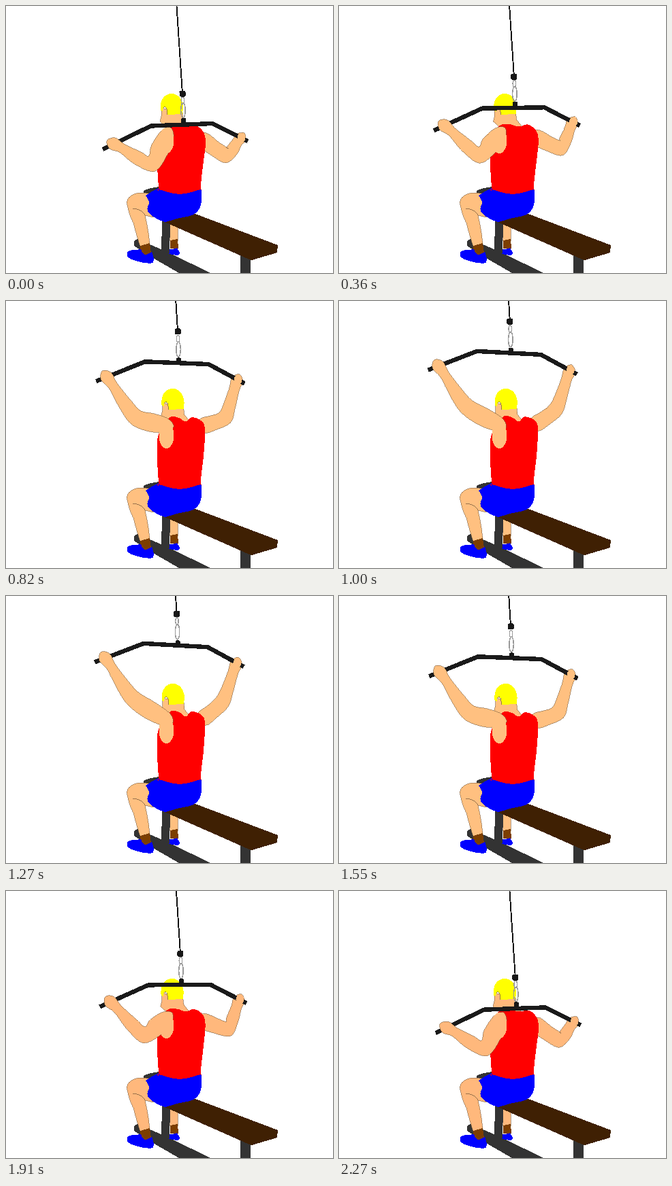
An HTML page for the animation above (2.36 s loop, 480 by 393 pixels).

```html
<!DOCTYPE html>
<html lang="en">
<head>
<meta charset="utf-8">
<title>Pulldown exercise</title>
<style>
  html, body { margin: 0; width: 100%; height: 100%; overflow: hidden; background: #fff; }
  svg { display: block; width: 100vw; height: 100vh; shape-rendering: crispEdges; }
  .skin { fill: var(--skin); stroke: #80603f; stroke-width: .6; }
  .bare { stroke: none; }
  .metal { fill: #333; }
  .wood { fill: #3f2003; }
  .sock { fill: #7c3e00; }
  .blue { fill: #00f; }
  .red { fill: #f00; }
  .line { fill: none; stroke: #80603f; stroke-width: .8; }
  .link { fill: none; stroke: #999; stroke-width: 1.4; }
  .dark { fill: #171717; }
  #bar { fill: none; stroke: #1a1a1a; stroke-width: 6.4; stroke-linejoin: round; }
  #cable { stroke: #111; stroke-width: 1.9; }
</style>
</head>
<body>
<svg viewBox="0 0 480 393">
  <g id="machine">
    <path class="metal" d="M202 272Q208 268 226 266V276L206 278Q201 276 202 272Z"/>
    <path class="metal" d="M188 346L193 343L241 364L300 393H254L216 371L188 353Z"/>
    <path class="skin" d="M239 316L252 313L252 346H241Z"/>
    <path class="sock" d="M241 345L252 343L253 357L241 357Z"/>
    <path class="blue" d="M239 358Q247 358 251 356L255 363Q255 367 251 367L239 365Z"/>
    <path class="metal" d="M344.3 364H359V393H344.3ZM229 315L241 319L240 364L228 363Z"/>
    <path class="wood" d="M233 318L240 313L278 306L399 352L398 363L361 374L357 373Z"/>
  </g>
  <g id="legs">
    <path class="skin" d="M209 276Q193 273 184 279Q175 285 178 293Q180 305 187 319Q191 336 197 354L211 351Q210 338 207 322Q205 313 204 308L216 311L222 285Z"/>
    <path class="line" d="M186 299Q198 297 205 309"/>
    <path class="sock" d="M197 353L211 349L213 364L205 367L198 362Z"/>
    <path class="blue" d="M178 363Q180 359 190 359L198 358Q200 366 206 366L214 362Q218 370 216 378Q207 380 194 376Q181 373 178 368Z"/>
    <path class="blue" d="M205 279Q213 273 224 268H286Q290 285 284 298Q280 306 270 309Q252 312 234 318Q219 314 210 305Q205 299 210 291Q210 285 205 279Z"/>
  </g>
  <path id="rightArm" class="skin"/>
  <g id="head">
    <path class="skin" d="M230 150V162L228 170L244 184H266L269 176L262 167L261 157Z"/>
    <path fill="#ff0" d="M229 154C227 141 233 129 245 129C257 129 262 141 262 150L261 159L239 160L238 151C236 147 232 148 232 155Z"/>
    <path class="line" d="M233 150Q237 146 238 152L239 160"/>
  </g>
  <path id="shirt" class="red"/>
  <path id="cable"/>
  <ellipse id="ring" class="link" rx="2.2" ry="5"/>
  <ellipse id="loop" class="link" rx="3.2" ry="11"/>
  <path id="bar"/>
  <rect id="hook" class="dark" width="7" height="8" rx="2"/>
  <rect id="knob" class="dark" width="9" height="9" rx="2"/>
  <path id="leftArm" class="skin"/>
  <ellipse class="skin bare" cx="235.5" cy="198" rx="11" ry="19"/>
  <ellipse id="fist" class="skin bare" rx="6" ry="7"/>
</svg>
<script>
const el = id => document.getElementById(id);
const mix = (a, b, t) => a + (b - a) * t;
const between = (p, q, t) => p.map((v, i) => mix(v, q[i], t));
const shift = ([x, y], dx, dy) => [x + dx, y + dy];

function set(id, attrs) {
  for (const name in attrs) el(id).setAttribute(name, attrs[name]);
}

// Quadratic curve from p to q, pulled towards c.
const arc = (p, c, q, t) => between(between(p, c, t), between(c, q, t), t);

// Closed smooth curve through all points.
function smooth(pts) {
  const n = pts.length;
  const at = i => pts[(i + n) % n];
  const ctrl = (p, a, b) => p.map((v, i) => v + (b[i] - a[i]) / 6);
  return 'M' + pts[0] + pts.map((p, i) => {
    const next = at(i + 1);
    return 'C' + [ctrl(p, at(i - 1), next), ctrl(next, at(i + 2), p), next].join(' ');
  }).join('') + 'Z';
}

// Outline of an arm: six joints, each with its own radius.
function limb(shoulder, elbow, hand, radii) {
  const nodes = [
    shoulder,
    shift(between(shoulder, elbow, .5), 0, 1.5),
    elbow,
    shift(between(elbow, hand, .35), 0, 2.5),
    between(elbow, hand, .75),
    hand
  ];
  const last = nodes.length - 1;
  const left = [], right = [], caps = [];
  nodes.forEach((p, i) => {
    const a = nodes[Math.max(i - 1, 0)], b = nodes[Math.min(i + 1, last)];
    const len = Math.hypot(b[0] - a[0], b[1] - a[1]);
    const dx = (b[0] - a[0]) / len * radii[i], dy = (b[1] - a[1]) / len * radii[i];
    left.push(shift(p, -dy, dx));
    right.unshift(shift(p, dy, -dx));
    if (i === 0) caps.push(shift(p, -dx, -dy));
    if (i === last) caps.push(shift(p, dx, dy));
  });
  return smooth([caps[0], ...left, caps[1], ...right]);
}

// s is the height of the bar: 0 behind the neck, 1 overhead.
function pose(s) {
  const go = (p, q) => between(p, q, s);
  const knob = go([259, 129], [250.5, 25]);
  const hook = go([260.5, 169], [252, 68]);
  const leftTip = go([142, 211], [130, 96]), rightTip = go([355, 199], [349, 103]);
  const leftBend = go([213, 176.5], [202, 68.5]), rightBend = go([303, 173], [296, 74]);
  const leftHand = shift(between(leftTip, leftBend, .2), 0, -2);
  const rightHand = between(rightTip, rightBend, .2);

  set('cable', { d: `M${go([250.5, 0], [249, 0])}L${knob}` });
  set('knob', { x: knob[0] - 4.5, y: knob[1] - 4.5 });
  set('hook', { x: hook[0] - 3.5, y: hook[1] - 4 });
  [['ring', .25], ['loop', .62]].forEach(([id, t]) => {
    const [cx, cy] = between(knob, hook, t);
    set(id, { cx, cy });
  });
  set('bar', { d: 'M' + [leftTip, leftBend, rightBend, rightTip].join('L') });
  set('head', { transform: `translate(${-2 * (1 - s)})` });

  const hem = [[285.5, 270], [285.5, 270], [255, 277], [224.5, 270], [224.5, 270]];
  set('shirt', { d: smooth([
    go([234, 178], [241, 170]), go([249, 175], [254, 171]), [264, 177.5],
    go([279, 176], [272, 170]), go([290, 186], [287, 175]), go([293, 202], [292, 188]),
    [290, 228], [287, 253], ...hem, [222.5, 245], [222, 208], [226, 192]
  ]) });

  const leftElbow = arc([214, 232], [197, 210], [187, 150], s);
  const rightElbow = arc([324, 220], [331, 200], [317, 155], s);
  set('leftArm', { d: limb(go([237, 188], [236, 182]), leftElbow, leftHand, [10, 13.5, 12, 10, 7, 9]) });
  set('rightArm', { d: limb(go([288, 196], [288, 181]), rightElbow, rightHand, [11, 11, 11, 9, 7.5, 8.5]) });
  set('fist', { cx: rightHand[0] + 1, cy: rightHand[1] });
}

function draw(step) {
  const e = (1 - Math.cos(Math.PI * step / 13)) / 2;
  pose(e * (1 + .14 * (1 - e)));
  document.documentElement.style.setProperty('--skin', step > 17 ? '#ffb87c' : '#ffc080');
}

let shown = -1;
function tick() {
  const t = performance.now() % 2360;
  // Two of the 26 steps last 100 ms, the others 90 ms.
  const step = Math.floor((t - 10 * (t >= 540) - 10 * (t >= 1540)) / 90);
  if (step !== shown) draw(shown = step);
  requestAnimationFrame(tick);
}
tick();
</script>
</body>
</html>
```
